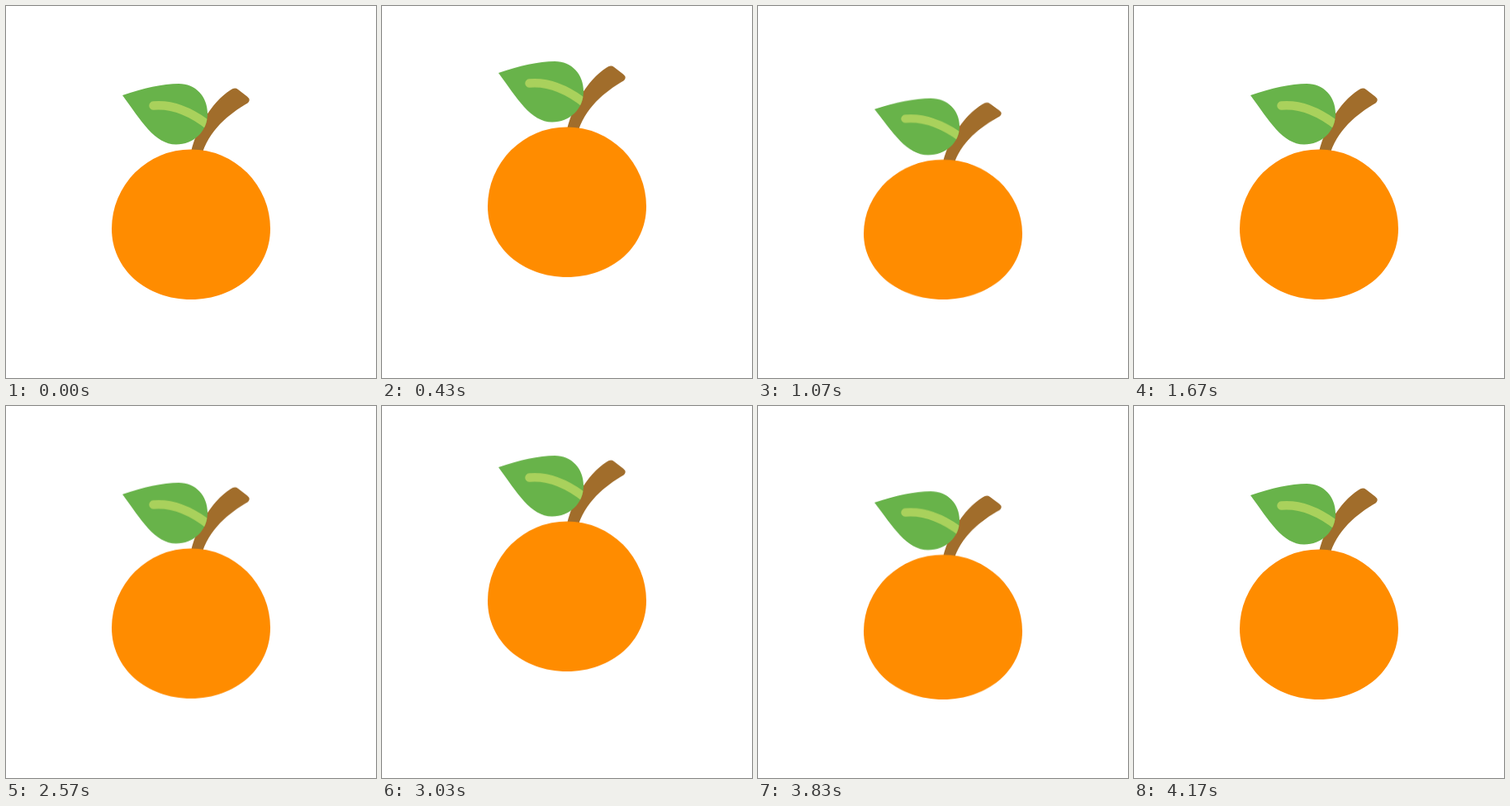
Recreate the animation shown at these times as an HTML page without scripts. Size 448 px wide and 450 px high, loop 4210 ms.

```html
<!DOCTYPE html>
<html lang="en">
<head>
<meta charset="utf-8">
<title>Hopping orange</title>
<style>
  html, body {
    margin: 0;
    width: 100%;
    height: 100%;
    overflow: hidden;
    background: #fff;
  }
  svg {
    display: block;
    width: 448px;
    height: 450px;
  }
  .orange {
    transform-origin: 224px 355px;
    animation: hop 4210ms cubic-bezier(.333, 0, .667, 1) infinite;
  }
  /* two hops of 1667 ms, the second starting at 2500 ms:
     slow rise, quick drop, squash, slow recovery */
  @keyframes hop {
    0%, 19.79%, 39.59%, 59.38%, 79.18%, 98.97%, 100% {
      transform: translateY(0) scaleY(1);
    }
    15.84%, 75.22% {
      transform: translateY(-38px) scaleY(1);
    }
    23.75%, 83.14% {
      transform: translateY(0) scaleY(.93);
    }
  }
</style>
</head>
<body>
<svg viewBox="0 0 448 450">
  <defs>
    <path id="leaf" d="M141 108C166 99.500 190 94 209 94C230 94 244 110 244 130C244 152 227 167.500 206 167.500C180 167.500 163.500 138.500 141 108Z"/>
    <clipPath id="edge"><use href="#leaf"/></clipPath>
  </defs>
  <g class="orange">
    <path fill="#a16d2b" d="M223 182C228 152 248.500 116 272 101.500Q277 98 281 101L292 109.500Q297 113.500 292.500 117.500C270 130.500 245 150.500 236.500 182Z"/>
    <use href="#leaf" fill="#68b34a"/>
    <path clip-path="url(#edge)" fill="none" stroke="#a9d15c" stroke-width="10.500" stroke-linecap="round" d="M178.500 120.500C201 118.500 223 127 246 145"/>
    <path fill="#ff8c00" d="M128 269.500A96 96 0 0 1 320 269.500C320 318.500 278 355 224 355S128 318.500 128 269.500Z"/>
  </g>
</svg>
</body>
</html>
```
